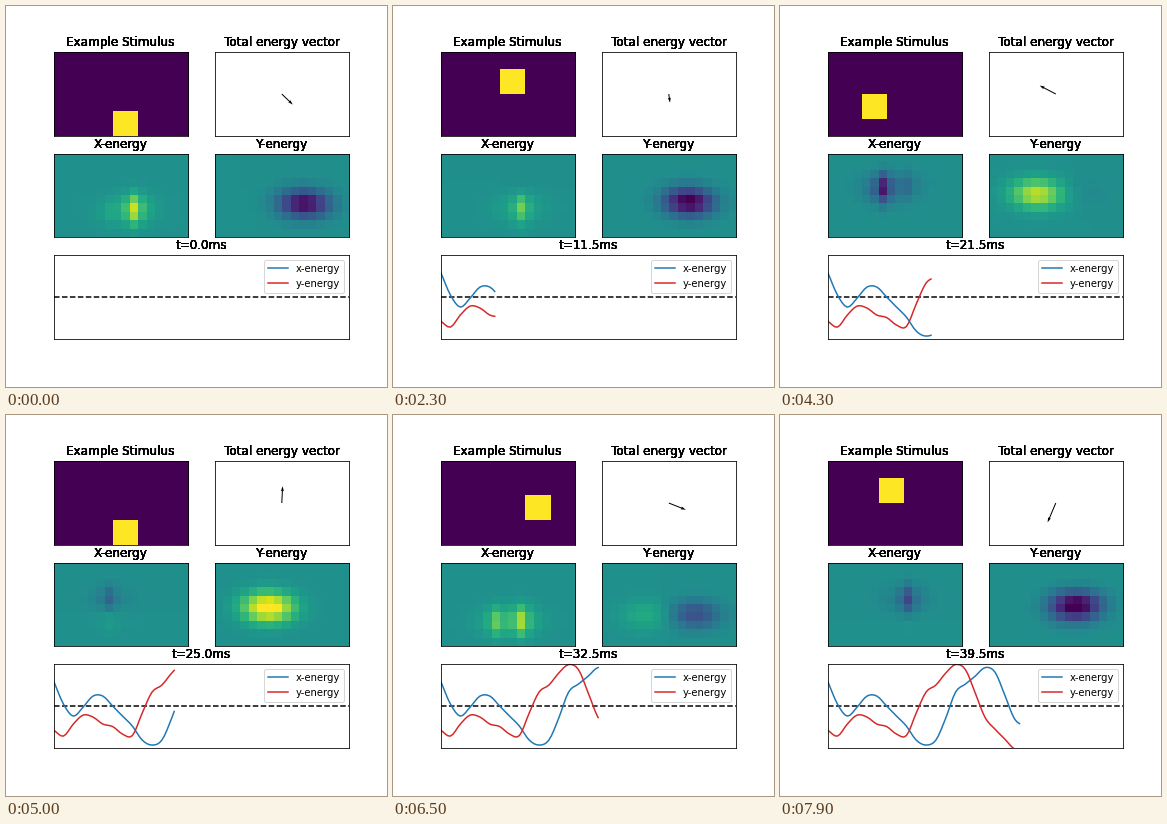
A matplotlib script for the animation above (8000 ms loop, 381x381 px).

```python
import numpy as np
import matplotlib.pyplot as plt
from matplotlib.animation import FuncAnimation

SIZE, DPI = 381, 72
FRAMES, INTERVAL = 80, 100
STEP = 0.5                  # ms of model time per frame
PERIOD, SPAN = 25, 60       # orbit period and recording length, ms
ROWS, COLS = 10, 16
LAG, SPREAD, SEAM = 6.8, 1.8, 3.0

row, col = np.mgrid[0:ROWS, 0:COLS]
tau = np.linspace(-4, 4, 33)
kernel = np.exp(-0.5 * (tau / SPREAD) ** 2)
kernel /= kernel.sum()


def smooth(knots, gap=4):
    """Catmull-Rom curve through evenly spaced knots."""
    p = np.r_[2 * knots[0] - knots[1], knots, 2 * knots[-1] - knots[-2]]
    u = np.arange(gap) / gap
    parts = []
    for a, b, c, d in zip(p, p[1:], p[2:], p[3:]):
        parts.append(b + 0.5 * u * (c - a + u * (2 * a - 5 * b + 4 * c - d
                                                 + u * (3 * (b - c) + d - a))))
    return np.concatenate(parts)


x_total = smooth([25, 2, -10, -1, 10, 10, 0, -10, -20, -34, -39, -34, -12,
                  14, 22, 30, 38.5, 34, 11, -13, -20])
y_total = smooth([-24, -30, -18, -9, -11, -18, -20.5, -28, -29.5, -7, 14, 21,
                  33, 41.5, 36.5, 13, -11.5, -23, -33, -43, -44])


def stimulus(t):
    a = 2 * np.pi * t / PERIOD
    cx, cy = 8 + int(4 * np.sin(a)), 5 + int(3 * np.cos(a))
    return ((abs(col - cx) <= 1) & (abs(row - cy) <= 1)).astype(float)


def soft_sign(v):
    return np.sign(v) * abs(v) ** 0.4


def energies(t):
    """Delayed, blurred motion energy along x and y."""
    a = (2 * np.pi * ((t - LAG + tau) % SPAN) / PERIOD)[:, None, None]
    s, c = np.sin(a), np.cos(a)
    fade = 1 - 0.75 * np.exp(-((t - LAG) / SEAM) ** 2)
    w = kernel[:, None, None] * fade

    right = 0.5 * (1 + np.tanh(2 * s))
    across = (right * np.exp(-abs(col - 9) / 1.2)
              + (1 - right) * np.exp(-abs(col - 6) / 1.2))
    down = np.exp(-0.5 * ((row - 5 - 1.7 * c) / 1.2) ** 2)
    ex = 1.3 * (w * soft_sign(c) * across * down).sum(0)

    mid = 7.75 + np.sign(s) * (3.2 - 1.5 * s ** 2)
    across = np.exp(-0.5 * ((col - mid) / 2.1) ** 2)
    down = np.exp(-0.5 * ((row - 5 - 0.9 * c) / 1.2) ** 2)
    ey = -1.25 * (w * soft_sign(s) * across * down).sum(0)
    return ex, ey


def heading(ax, text, layers=8):
    """Stacked copies give the heavy, hard-edged look."""
    return [ax.annotate(text, (0.5, 1), xycoords="axes fraction",
                        xytext=(0, 6), textcoords="offset points",
                        ha="center", va="baseline", fontsize=12)
            for _ in range(layers)]


def panel(pos, title, vmin=None):
    ax = fig.add_subplot(3, 2, pos, xticks=[], yticks=[])
    heading(ax, title)
    if vmin is None:
        return ax
    return ax.imshow(np.zeros((ROWS, COLS)), cmap="viridis", vmin=vmin, vmax=1,
                     interpolation="nearest")


plt.rcParams["font.family"] = "DejaVu Sans"
fig = plt.figure(figsize=(SIZE / DPI, SIZE / DPI), dpi=DPI, facecolor="white")
fig.subplots_adjust(left=0.125, right=0.9, bottom=0.125, top=0.88,
                    wspace=0.2, hspace=0.2)

stim_img = panel(1, "Example Stimulus", 0)
vec_ax = panel(2, "Total energy vector")
x_img = panel(3, "X-energy", -1)
y_img = panel(4, "Y-energy", -1)

vec_ax.set(xlim=(-1, 1), ylim=(-1, 1))
arrow = vec_ax.quiver([0], [0], [1], [1], scale=134.2, scale_units="width")

trace = fig.add_subplot(3, 1, 3, xlim=(0, SPAN / STEP), ylim=(-42.3, 42.3),
                        xticks=[], yticks=[])
trace.axhline(0, color="black", ls="--")
x_line, = trace.plot([], [], color="tab:blue", label="x-energy")
y_line, = trace.plot([], [], color="tab:red", label="y-energy")
trace.legend(loc="upper right", fontsize=10)
clock = heading(trace, "")


def update(i):
    t = i * STEP
    ex, ey = energies(t)
    stim_img.set_data(stimulus(t))
    x_img.set_data(ex)
    y_img.set_data(ey)
    arrow.set_UVC([0.44 * x_total[i]], [0.44 * y_total[i]])
    x_line.set_data(np.arange(i), x_total[:i])
    y_line.set_data(np.arange(i), y_total[:i])
    for label in clock:
        label.set_text(f"t={t:.1f}ms")
    return [stim_img, x_img, y_img, arrow, x_line, y_line, *clock]


anim = FuncAnimation(fig, update, frames=FRAMES, interval=INTERVAL,
                     repeat=True, repeat_delay=0, blit=False)
plt.show()
```
